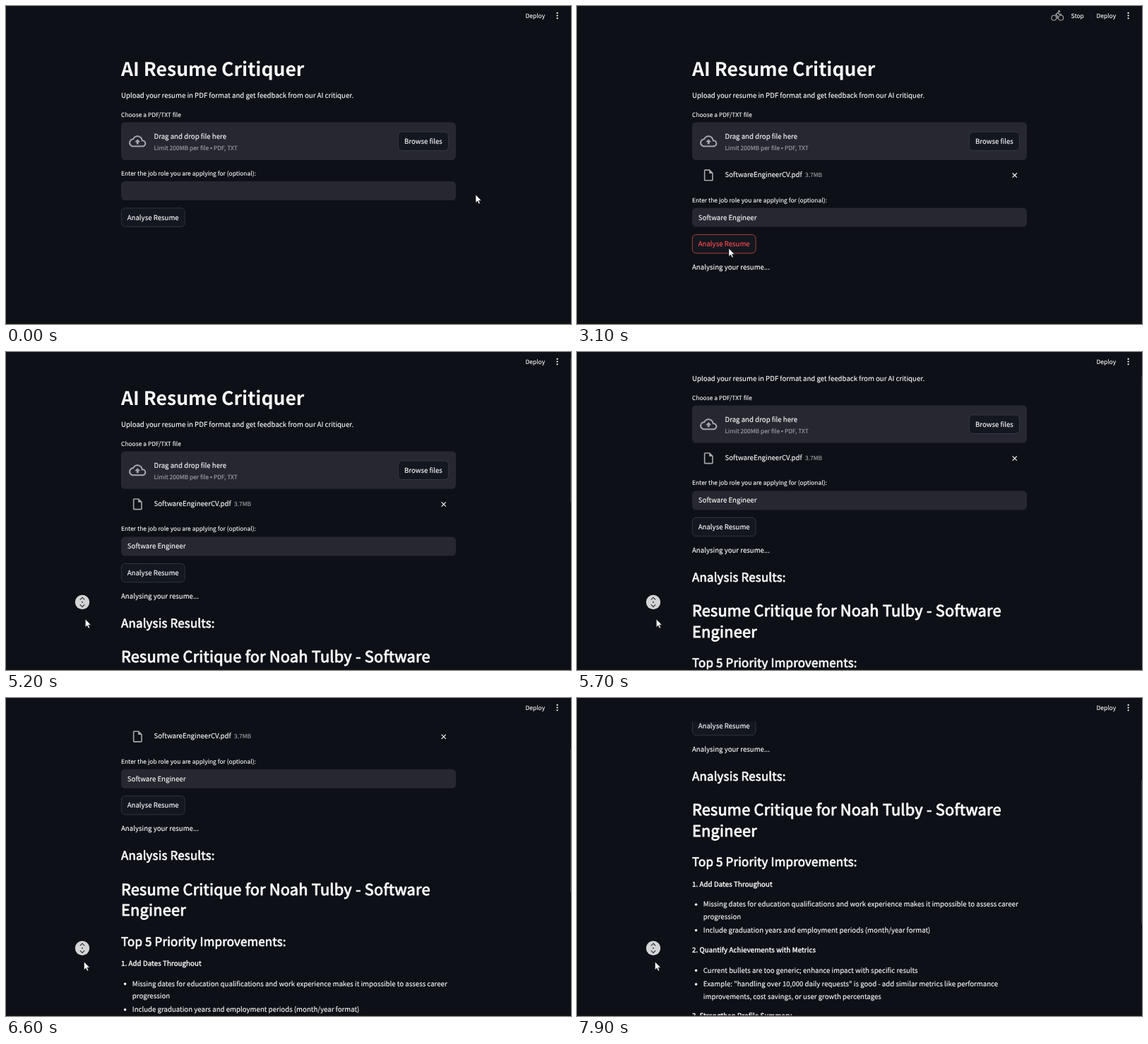
An HTML page that plays this animation: 800x450 px, repeating every 8 s.

```html
<!DOCTYPE html>
<html lang="en">
<head>
<meta charset="utf-8">
<title>AI Resume Critiquer</title>
<style>
  html, body { margin: 0; width: 100%; height: 100%; overflow: hidden; background: #0d1017; }
  svg { display: block; width: 800px; height: 450px; }
  text {
    font-family: "Noto Sans CJK JP", "Noto Sans CJK SC", "Noto Sans CJK", "Open Sans", sans-serif;
    fill: #fafafa; stroke: #fafafa; stroke-width: .014em; stroke-linejoin: round;
    text-rendering: geometricPrecision; white-space: pre;
  }
  .bold { font-weight: 700; stroke: none; }
  .semi { stroke-width: .042em; letter-spacing: .0108em; }
  .muted { fill: #a3a4a9; stroke: #a3a4a9; }
  .mid { text-anchor: middle; }
  .end { text-anchor: end; }
  .dot { font-family: "Liberation Sans", sans-serif; }
  .field { fill: #262730; }
  .button rect { fill: #131720; stroke: #41444c; stroke-width: .67; }
  .button.hover rect { stroke: #ff4b4b; }
  .button.hover text { fill: #ff4b4b; stroke: #ff4b4b; }
  .icon { fill: #a6a7ac; }
  .line { fill: none; stroke: #a6a7ac; stroke-linecap: round; stroke-linejoin: round; }
</style>
</head>
<body>
<svg id="stage" viewBox="0 0 800 450"></svg>
<script>
const LOOP = 8000;
const FONT_SCALE = 0.6037;   // page px to stage px, corrected for the font's larger em
const FILE_ROW = 37.6;       // height the uploaded file adds
const ROLE = 'Software Engineer';

const text = (x, y, size, str, cls = '', id = '') =>
  `<text x="${x}" y="${y}" font-size="${(size * FONT_SCALE).toFixed(2)}" class="${cls}" id="${id}">${str}</text>`;
const box = (x, y, w, h, attrs = '') =>
  `<rect x="${x}" y="${y}" width="${w}" height="${h}" rx="5.4" ${attrs}/>`;
const button = (x, y, w, label, id) =>
  `<g class="button" id="${id}">${box(x, y, w, 26.4)}${text(x + w / 2, y + 16.8, 16, label, 'mid')}</g>`;
const bullet = (y, ...lines) =>
  `<circle cx="168.6" cy="${y - 3.2}" r="1.8" fill="#fafafa"/>` +
  lines.map((s, i) => text(178.8, y + i * 17.3, 16, s)).join('');

const uploader = `
  ${text(163, 99.3, 44, 'AI Resume Critiquer', 'bold')}
  ${text(163, 130, 16, 'Upload your resume in PDF format and get feedback from our AI critiquer.')}
  ${text(163, 157, 14, 'Choose a PDF/TXT file')}
  ${box(163, 164.6, 474, 53.3, 'class="field"')}
  <path class="icon" transform="translate(174.1 179.3) scale(1.01)" d="M19.35 10.04A7.49 7.49 0 0 0 12 4C9.11 4 6.6 5.64 5.35 8.04A6 6 0 0 0 0 14c0 3.31 2.69 6 6 6h13c2.76 0 5-2.24 5-5 0-2.64-2.05-4.78-4.65-4.96zM19 18H6c-2.21 0-4-1.79-4-4 0-2.05 1.53-3.76 3.56-3.97l1.07-.11.5-.95A5.47 5.47 0 0 1 12 6c2.62 0 4.88 1.86 5.39 4.43l.3 1.5 1.53.11A2.98 2.98 0 0 1 22 15c0 1.65-1.35 3-3 3zM8 13h2.55v3h2.9v-3H16l-4-4-4 4z"/>
  ${text(209.5, 188.1, 16, 'Drag and drop file here')}
  ${text(209.5, 204.2, 14, 'Limit 200MB per file <tspan class="dot">•</tspan> PDF, TXT', 'muted')}
  ${button(555.4, 178.2, 71, 'Browse files', 'browse')}`;

const fileRow = `
  <path class="icon" transform="translate(176.6 229.7) scale(.81)" d="M14 2H6c-1.1 0-2 .9-2 2v16c0 1.1.9 2 2 2h12c1.1 0 2-.9 2-2V8l-6-6zM6 20V4h7v5h5v11H6z"/>
  ${text(209.5, 242.1, 16, 'SoftwareEngineerCV.pdf')}
  ${text(323, 242, 14, '3.7MB', 'muted')}
  <path d="M616.6 236.5l6.2 6.2m0-6.2l-6.2 6.2" stroke="#fafafa" stroke-width="1.2"/>`;

const form = `
  ${text(163, 277.6, 14, 'Enter the job role you are applying for (optional):')}
  ${box(163, 285.7, 474, 26.9, 'class="field" id="field"')}
  ${text(171.8, 302.6, 16, '', '', 'role')}
  <rect id="caret" y="292.3" width=".8" height="13.2" fill="#fafafa"/>
  ${text(631.3, 307.2, 12, 'Press Enter to apply', 'muted end', 'hint')}
  ${button(163.3, 323.5, 89.8, 'Analyse Resume', 'analyse')}`;

const results = `
  ${text(163, 414.2, 28, 'Analysis Results:', 'semi')}
  ${text(163, 463.6, 36, 'Resume Critique for Noah Tulby - Software', 'semi')}
  ${text(163, 493, 36, 'Engineer', 'semi')}
  ${text(163, 535.5, 28, 'Top 5 Priority Improvements:', 'semi')}
  ${text(163, 564.3, 16, '1. Add Dates Throughout', 'semi')}
  ${bullet(592.7, 'Missing dates for education qualifications and work experience makes it impossible to assess career', 'progression')}
  ${bullet(629.2, 'Include graduation years and employment periods (month/year format)')}
  ${text(163, 657.5, 16, '2. Quantify Achievements with Metrics', 'semi')}
  ${bullet(686, 'Current bullets are too generic; enhance impact with specific results')}
  ${bullet(705.5, 'Example: "handling over 10,000 daily requests" is good - add similar metrics like performance', 'improvements, cost savings, or user growth percentages')}
  ${text(163, 750.6, 16, '3. Strengthen Profile Summary', 'semi')}`;

const header = `
  <rect width="800" height="33.5" fill="#0d1017"/>
  <g id="running">
    <g class="line" stroke-width="1.1">
      <circle cx="675.3" cy="16.7" r="3.5"/><circle cx="685.2" cy="16.7" r="3.5"/>
      <path d="M680.2 17.4v-3.2l-2.3-2.1 2.9-2.7 2.3 2.3h2.6" stroke-width="1.4"/>
    </g>
    <circle class="icon" cx="682.6" cy="7.4" r="1.5"/>
    ${text(699.6, 17, 14, 'Stop')}
  </g>
  ${text(735.5, 17, 14, 'Deploy')}
  ${[9.9, 13.6, 17.3].map(y => `<circle cx="780.6" cy="${y}" r="1.15" fill="#fafafa"/>`).join('')}`;

document.getElementById('stage').innerHTML = `
  <rect width="800" height="450" fill="#0d1017"/>
  <g id="page">
    ${uploader}
    <g id="fileRow">${fileRow}</g>
    <g id="form">${form}</g>
    <g id="status">${text(163, 373.2, 16, 'Analysing your resume...')}</g>
    <g id="results">${results}</g>
  </g>
  ${header}
  <rect id="thumb" x="799" width="1" height="203" fill="#383a42"/>
  <rect y="449" width="800" height="1" fill="#1c1412"/>
  <g id="autoscroll">
    <circle cx="108" cy="354" r="10.2" fill="#d3d4d6"/>
    <circle cx="108" cy="354" r="1" fill="#333"/>
    <path d="M104.8 350.6l3.2-3.2 3.2 3.2m-6.4 6.8l3.2 3.2 3.2-3.2" fill="none" stroke="#333" stroke-width="1.2"/>
  </g>
  <path id="arrow" d="M0 0V11.4L2.6 9 4.4 13 6.3 12.2 4.5 8.2H8z" fill="#fff" stroke="#15171c" stroke-width=".6"/>
  <path id="beam" d="M-1.8-4.6H-.5L0-4.1.5-4.6H1.8M0-4.1V4.1M-1.8 4.6H-.5L0 4.1.5 4.6H1.8" fill="none" stroke="#e4e4e6" stroke-width=".8"/>`;

const el = {};
document.querySelectorAll('#stage [id]').forEach(node => { if (node.id) el[node.id] = node; });

const SCROLL = [[4900, 0], [5200, 24], [5700, 89], [6100, 141.5], [6600, 184.8], [7400, 253.8], [8000, 305.8]];
const POINTER = [
  [300, 665, 267], [950, 303.5, 305.5], [2250, 303.5, 305.5], [2700, 215, 343], [3100, 215, 343],
  [3950, 117.5, 356], [4700, 117.5, 356], [4850, 108, 354], [4900, 108, 354],
  [5200, 112.3, 378], [5750, 112.3, 378], [6100, 110.5, 373.3]
];

const smooth = p => p * p * (3 - 2 * p);
function along(keys, t, ease = p => p) {
  const next = keys.findIndex(k => k[0] > t);
  if (next === 0) return keys[0].slice(1);
  if (next < 0) return keys[keys.length - 1].slice(1);
  const a = keys[next - 1], b = keys[next];
  const p = ease((t - a[0]) / (b[0] - a[0]));
  return a.slice(1).map((v, i) => v + (b[i + 1] - v) * p);
}

const show = (node, on) => node.setAttribute('display', on ? 'inline' : 'none');
const move = (node, x, y) => node.setAttribute('transform', `translate(${x} ${y})`);

function draw(t) {
  const [scroll] = along(SCROLL, t);
  const [x, y] = along(POINTER, t, smooth);
  const uploaded = t >= 300;
  const focused = t >= 1000 && t < 2400;
  const done = t >= 4400;
  const typed = Math.max(0, Math.min(ROLE.length, Math.floor((t - 1100) / 52)));

  move(el.page, 0, -scroll);
  show(el.fileRow, uploaded);
  move(el.form, 0, uploaded ? 0 : -FILE_ROW);

  el.role.textContent = ROLE.slice(0, typed);
  el.field.setAttribute('stroke', focused ? '#ff4b4b' : 'none');
  el.field.setAttribute('stroke-width', 0.67);
  show(el.caret, focused);
  el.caret.setAttribute('x', 171.8 + (typed ? el.role.getComputedTextLength() : 0));
  show(el.hint, focused && typed > 0);

  const overButton = uploaded && t < 4000 && x > 163 && x < 253 && y > 323 && y < 350;
  el.analyse.classList.toggle('hover', overButton);
  show(el.status, t >= 2900);
  show(el.running, t >= 2900 && !done);
  show(el.results, done);
  show(el.thumb, done);
  el.thumb.setAttribute('y', 0.39 * scroll);
  show(el.autoscroll, t >= 4850);

  const overField = uploaded && t < 4000 && x > 163 && x < 637 && y > 285 && y < 313;
  show(el.arrow, !overField);
  show(el.beam, overField);
  move(el.arrow, x, y);
  move(el.beam, x, y);
}

const start = performance.now();
function tick() {
  draw((performance.now() - start) % LOOP);
  requestAnimationFrame(tick);
}
tick();
</script>
</body>
</html>
```
